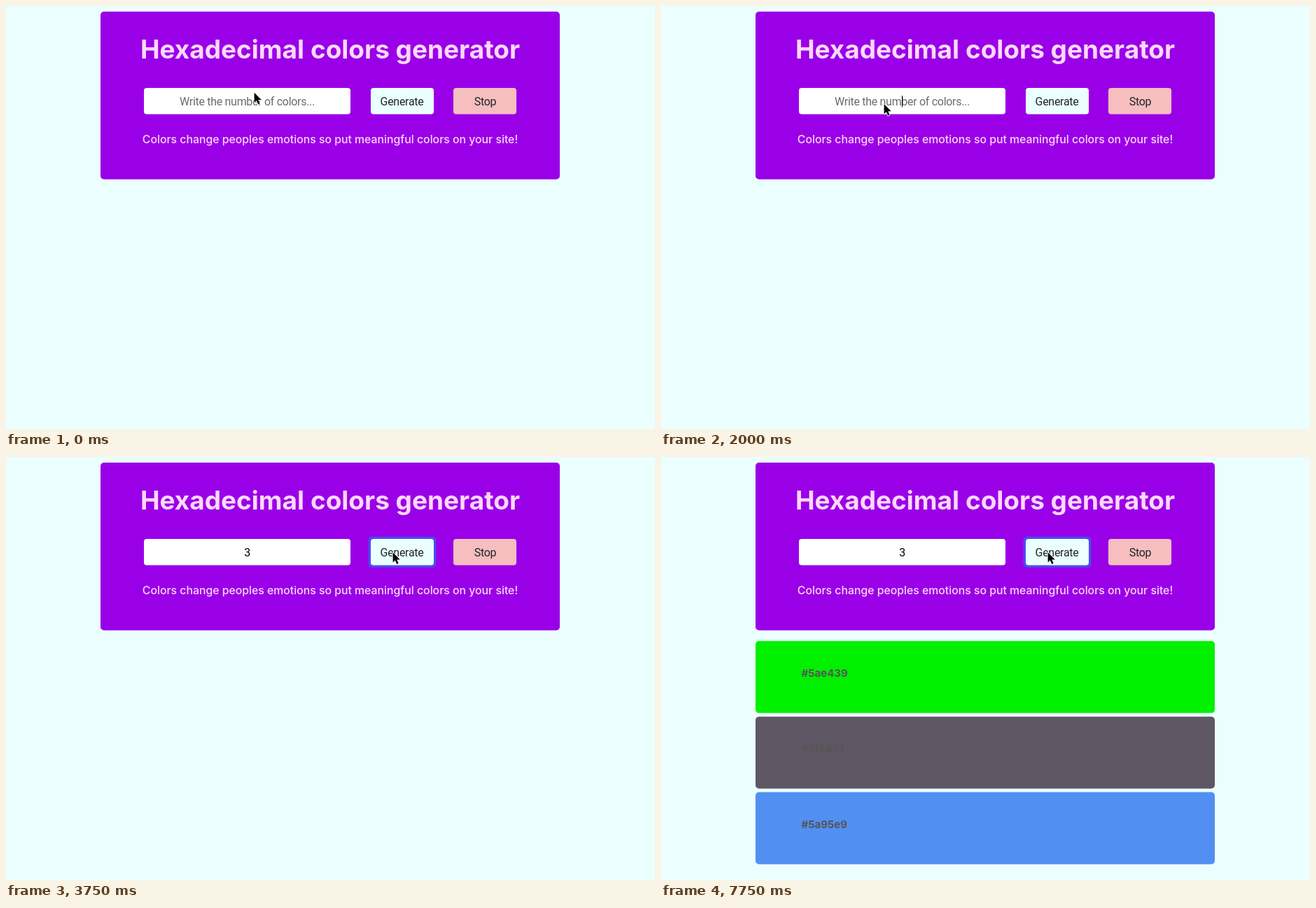
Animation of 927x604 px, one loop 8000 ms. Source, as an HTML page:

```html
<!DOCTYPE html>
<html lang="en">
<head>
<meta charset="utf-8">
<title>Hexadecimal colors generator</title>
<style>
  html, body { margin: 0; width: 100%; height: 100%; overflow: hidden; background: #ebffff; }
  svg { display: block; }
  .brand { font-family: Inter, "Open Sans", sans-serif; fill: #ffd9fb; }
  .ui { font: 16px Roboto, Inter, sans-serif; letter-spacing: -.3px; fill: #212529; }
  .mid { text-anchor: middle; }
  .code { font: 700 15px Inter, sans-serif; fill: #555; }
</style>
</head>
<body>
<svg width="927" height="604" viewBox="0 0 927 604">
  <rect x="135" y="8" width="656" height="239.5" rx="5" fill="#9a00e8"/>
  <text class="brand mid" x="463" y="74.5" font-size="37" font-weight="700">Hexadecimal colors generator</text>

  <rect x="197" y="117" width="295" height="37.5" rx="4" fill="#fff"/>
  <text id="field" class="ui mid" x="344.5" y="142"></text>
  <rect id="caret" y="128" width="1" height="16.5"/>

  <rect id="ring" x="517.7" y="113.8" width="96.6" height="44" rx="5" fill="#4d4bf0"/>
  <rect x="521" y="117" width="90" height="37.5" rx="4" fill="#ebffff"/>
  <text class="ui mid" x="565.5" y="142">Generate</text>
  <rect x="639" y="117" width="90" height="37.5" rx="4" fill="#f6bebe"/>
  <text class="ui mid" x="684.5" y="142">Stop</text>

  <text class="brand mid" x="463" y="196" font-size="15.8" font-weight="500">Colors change peoples emotions so put meaningful colors on your site!</text>

  <g id="cards"></g>
  <path id="cursor" d="M0 0V14.2L3.2 11.2 5.6 16.6 8 15.5 5.7 10.2H10.2Z"
        stroke="#fff" stroke-width="1.6" paint-order="stroke" stroke-linejoin="round"/>
</svg>
<script>
const $ = id => document.getElementById(id);
const LOOP = 8000;

// [start ms, x, y] of the pointer tip; it jumps from place to place
const pointer = [
  [0, 354.6, 123.8], [250, 321.6, 147.5], [500, 318.6, 139.8], [750, 317, 140.2],
  [1000, 318.6, 140], [2750, 317, 140.2], [3000, 533, 136.5],
  [3250, 554, 137.5], [3750, 552.6, 136.3]
];

// [start ms, ...[label, fill]]
const palettes = [
  [0],
  [5750, ["#c25f53", "#cf5748"], ["#db1438", "#ee001f"], ["#283fac", "#312ab3"]],
  [7750, ["#5ae439", "#00f000"], ["#5f5861", "#605765"], ["#5a95e9", "#528ff2"]]
];

const at = (steps, t) => steps.findLast(s => s[0] <= t);
const show = (id, on) => $(id).setAttribute("visibility", on ? "visible" : "hidden");

const card = ([label, fill], i) => {
  const y = 262.8 + i * 107.9;
  return `<rect x="135" y="${y}" width="656" height="102.8" rx="5" fill="${fill}"/>
    <text class="code" x="200.5" y="${y + 51.5}">${label}</text>`;
};

let palette;
function draw(now) {
  const t = now % LOOP;
  const typed = t >= 2500;

  $("field").textContent = typed ? "3" : "Write the number of colors...";
  $("field").style.fill = typed ? "#000" : "#6b6b6b";
  $("caret").setAttribute("x", typed ? 349 : 344);
  show("caret", t >= 1000 && t < 3000 && !(t >= 1500 && t < 2000));
  show("ring", t >= 3500);

  const [, x, y] = at(pointer, t);
  $("cursor").setAttribute("transform", `translate(${x} ${y})`);

  const next = at(palettes, t);
  if (next !== palette) {
    palette = next;
    $("cards").innerHTML = palette.slice(1).map(card).join("");
  }
  requestAnimationFrame(draw);
}
draw(performance.now());
</script>
</body>
</html>
```
